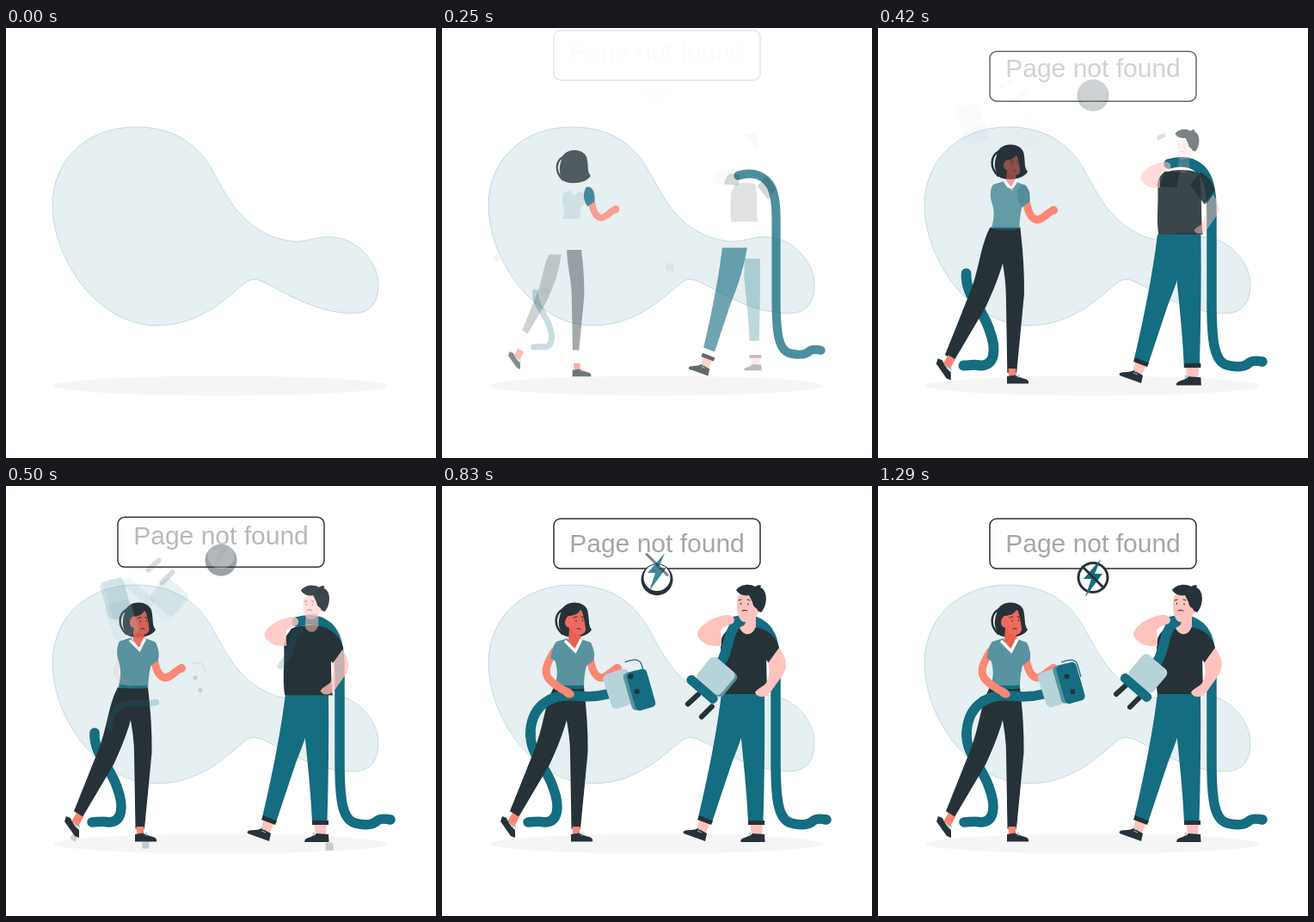
Write an HTML page that moves like this. It is 500 by 500 pixels and loops after 1.33 s.

```html
<!DOCTYPE html>
<html lang="en">
<head>
<meta charset="utf-8">
<title>Page not found</title>
<style>
  html, body { margin: 0; width: 100%; height: 100%; overflow: hidden; background: #fff; }
  svg { display: block; width: 100vw; height: 100vh; }
  [data-in] { transform-box: fill-box; transform-origin: center; opacity: 0; }
  .dark { fill: #263238; }
  .teal { fill: #146d80; }
  .mid { fill: #58939f; }
  .pale { fill: #b7d3da; }
  .rose { fill: #fd8774; }
  .pink { fill: #ffc3bd; }
  .chip { fill: #263238; fill-opacity: .22; }
  .cable { fill: none; stroke: #146d80; stroke-width: 11.5; stroke-linecap: round; }
  .limb { fill: none; stroke: #fd8774; stroke-width: 9; stroke-linecap: round; }
  .line { fill: none; stroke: #263238; stroke-linecap: round; }
  .lace { fill: none; stroke: #8cc0cb; stroke-width: 1; }
</style>
</head>
<body>
<!-- data-in: start ms, duration ms, initial scale, initial dx, initial dy -->
<svg viewBox="0 0 500 500">
  <path d="M151 115C200 115 225 140 238 162C252 186 264 214 290 232C308 244 328 249 342 248C354 247 364 242 378 243C408 244 433 272 433 298C433 322 422 332 402 332C365 331 330 312 307 299C296 293 287 290 280 295C262 308 230 346 175 346C108 346 54 270 54 205C55 150 97 115 151 115Z" fill="#e6eff2" stroke="#7fb0bb" stroke-width=".4"/>
  <ellipse cx="249.5" cy="416" rx="194" ry="11.3" fill="#f5f5f5"/>

  <!-- banner -->
  <rect data-in="153 545 1 0 -40" x="130" y="38" width="240" height="58" rx="8" fill="#fff" stroke="#263238" stroke-width="1.5"/>
  <text data-in="190 600 1 0 -40" x="250" y="76.5" text-anchor="middle" font-family="'Liberation Sans', Arial, sans-serif" font-size="30" fill="#a6a6a6">Page not found</text>

  <!-- no-power sign -->
  <circle data-in="223 770 1 0 -37" class="dark" cx="250" cy="106.5" r="18.5"/>
  <circle data-in="300 780 1 0 -34" cx="250" cy="106.5" r="15.5" fill="#fff"/>
  <path data-in="395 820 1 0 -36" class="teal" d="M259 85L239 108H248L241 129L261 102H252Z"/>
  <path data-in="490 800 1 0 -36" class="line" stroke-width="3" d="M238 94L262 118"/>

  <!-- woman -->
  <path data-in="170 320 .5" class="cable" d="M103 287C102 312 120 324 129 350C138 374 135 391 119 391C112 389 106 391 100 391"/>
  <path data-in="172 320 .5" class="dark" d="M130 234H153C149 265 139 295 125 324L89 385L79 378L109 303C119 275 119 255 130 234Z"/>
  <path data-in="141 320 .5" class="dark" d="M141 234H165C168 260 170 285 169.500 310L161 398.500H150.500L149 310C149 285 141 260 141 234Z"/>
  <path data-in="150 420 1 -18 -165" class="chip" d="M77 392l6 4l-4 7l-6 -4z"/>
  <path data-in="150 420 1 -50 -130" class="chip" d="M155 405h8v8h-8z"/>
  <g data-in="128 300 .6 16 -22">
    <path class="rose" d="M82 380L90 385L84 396L76 390Z"/>
    <path class="dark" d="M70 384L75 386Q78 394 85 400L85 409L80 407L68 390Z"/>
    <path class="lace" d="M78 392l5 3m-3 1l5 -2v4"/>
  </g>
  <g data-in="112 300 .6 0 -22">
    <path class="rose" d="M151.500 396H160.500L160 406H152Z"/>
    <path class="dark" d="M150 405L160 403.500C165 408 174 407 175 411V413.500H150Z"/>
    <path class="lace" d="M160 405l4 -2m-2 4l3 -3"/>
  </g>
  <path data-in="390 450 .5" class="cable" d="M192 242C176 246 165 245 152 244C124 242 103 258 103 290"/>
  <g data-in="92 310 .5">
    <path class="limb" d="M172 200C174 213 178 222 185 223C192 223 197 214 204 212"/>
    <ellipse class="rose" cx="204" cy="212" rx="5" ry="5"/>
    <path class="teal" d="M165 183C173 180 178 190 176 202L167 208C161 200 161 190 165 183Z"/>
  </g>
  <path data-in="162 430 .5" class="mid" d="M133 181L146 177C150 189 158 188 162 178L173 182C177 190 178 197 176 203L168 209Q165 220 165 234H131C135 220 134 212 132 205C129 197 129 186 133 181Z"/>
  <path data-in="250 450 .5" fill="none" stroke="#146d80" stroke-width="4" d="M131 232.500Q148 235 165 233.500"/>
  <g data-in="440 380 .6">
    <path class="limb" d="M130 193C122 206 118 216 124 224C130 231 138 236 147 240"/>
    <ellipse class="rose" cx="147" cy="241" rx="7" ry="5" transform="rotate(25 147 241)"/>
    <path class="mid" d="M133 181C127 188 128 196 126 200L134 205L139 188Z"/>
  </g>
  <g data-in="90 310 .75 0 25">
    <path class="dark" d="M138 148C139 133 164 131 169 144C172 155 169 161 174 167C169 176 152 178 142 174C134 166 135 156 138 148Z"/>
    <path class="line" stroke-width="2.500" d="M141 143C130 149 130 163 140 172"/>
  </g>
  <g data-in="240 460 .6">
    <path fill="#e8604f" d="M148 164L147 180L155 191L162 179L160 170Z"/>
    <path fill="#ee6a5c" d="M147 151C153 151 158 149 161 144C166 146 168 153 168 161C168 169 165 173 160 173C155 173 151 170 149 165C142 165 141 155 147 151Z"/>
    <path fill="none" stroke="#fff" stroke-width="3.500" d="M143 180L155 192L162 178"/>
    <path class="dark" d="M159 139C165 146 166 160 168 172L173 167C169 157 172 145 159 139Z"/>
    <path class="line" stroke-width="1" d="M156 156v1.500M163.500 155.500v1.500M153 153l4 -1M162 152l3 1M157 166h4"/>
  </g>

  <!-- socket -->
  <g data-in="392 450 1 -90 -100"><rect class="pale" x="190" y="213" width="31" height="42" rx="6" transform="rotate(-18 205.5 234)"/></g>
  <g data-in="380 540 1 -115 -120">
    <rect class="mid" x="208" y="207" width="20" height="45" rx="5" transform="rotate(-16 218 230)"/>
    <rect class="teal" x="212" y="206" width="24" height="46" rx="5" transform="rotate(-16 224 229)"/>
  </g>
  <g class="dark" data-in="400 480 .8"><circle cx="219.5" cy="221.5" r="3"/><circle cx="226.5" cy="239" r="3"/></g>
  <path data-in="400 500 .6" fill="none" stroke="#146d80" stroke-width="1.300" d="M213 205C222 201 230 201 232 208L236 222"/>

  <!-- man -->
  <path data-in="90 315 .5" class="cable" d="M338 158C358 152 374 158 382 174C388 188 388 205 388 220V320C388 365 391 388 406 392C418 395 427 394 432 389C436 386 442 387 447 388"/>
  <path data-in="163 320 .5" class="teal" d="M347 241H375C375.500 290 375 340 373.500 391H356C354 350 350 315 346 275Z"/>
  <path data-in="112 320 .5" class="teal" d="M325 241H361C355 275 346 300 337 322L314 391L298 385Q318 300 325 241Z"/>
  <path data-in="150 420 1 -130 -165" class="chip" d="M363 404h9v9h-9z"/>
  <g data-in="98 310 .6 16 -26">
    <path class="pink" d="M300 386L312 392L306 405L296 401Z"/>
    <path class="dark" d="M299 383L315 389.500L313 394L297 388Z"/>
    <path class="dark" d="M281 404C279 398 291 402 297 398L308 404L306 413Z"/>
    <path class="lace" d="M297 401l5 2m-4 -4l4 1"/>
  </g>
  <g data-in="156 320 .6 0 -18">
    <path class="pink" d="M358 390H373L372 406H360Z"/>
    <path class="dark" d="M356 389H375V394H356Z"/>
    <path class="dark" d="M347.500 414C346 408 358 409 361 404L375 405L375.500 414Z"/>
    <path class="lace" d="M356 407l3 -4m0 2l-2 -2"/>
  </g>
  <path data-in="140 480 .6" class="dark" d="M334 166L351 168L348 186L324 185C324 176 328 170 334 166Z"/>
  <path data-in="140 480 .6" class="dark" d="M375 167C385 172 390 180 392 189L380 206L362 182Z"/>
  <path data-in="165 430 .5" class="dark" d="M332 167C345 161 366 163 374 167C379 180 376 220 379 242H325C322 225 325 205 324 185Z"/>
  <path data-in="200 580 .6" class="pink" d="M392 188C402 203 402 210 396 220L381 241C375 247 366 246 364 240C367 235 374 233 377 229C380 222 382 215 379 206Z"/>
  <path data-in="300 500 .6" class="pink" d="M347 146H365V163C361 175 351 175 346 165Z"/>
  <path data-in="395 460 .6" class="cable" d="M347 158C335 162 334 182 329 195C326 205 319 213 314 219"/>
  <path data-in="155 640 .6 10 6" class="pink" d="M325 186C309 188 298 180 297 172C299 162 315 152 330 150C338 149 343 155 338 160C330 163 325 165 324 168Z"/>
  <g data-in="300 500 .6">
    <path class="pink" d="M344 128C350 123 366 122 369 135C371 140 373 146 367 148C365 155 358 159 351 158C343 156 342 140 344 128Z"/>
    <path class="line" stroke-width="1" d="M347.500 136v1.500M356 136.500v1.500M345 133l3 -1M355 132l3 1M349 145q3 -1.500 6 0"/>
  </g>
  <path data-in="205 500 .5" class="dark" d="M342 121C347 114 358 113 364 117C368 114 373 115 370 118C379 121 379 139 371 147L367 145C366 140 362 143 361 135L357 127C352 128 346 127 342 121Z"/>
  <path data-in="180 480 1 -150 15" class="chip" d="M362 122l10 -4v5l-9 4z"/>

  <!-- plug -->
  <g data-in="385 530 1 -135 -175"><path class="line" stroke-width="6" d="M289 231L277 242M305 245L293 257"/></g>
  <g data-in="400 570 1 -140 -100"><rect class="mid" x="296" y="201" width="36" height="34" rx="6" transform="rotate(40 314 218)"/></g>
  <g data-in="420 570 1 -140 -90"><rect class="pale" x="296" y="201" width="36" height="34" rx="6" transform="rotate(40 314 218)"/></g>
  <g data-in="425 580 1 -155 -118"><rect class="teal" x="278" y="229" width="44" height="11" rx="5" transform="rotate(41 300 234.5)"/></g>
</svg>
<script>
const LOOP = 1330;
const parts = [...document.querySelectorAll('[data-in]')].map(el => {
  const [start, span, scale, dx = 0, dy = 0] = el.dataset.in.split(' ').map(Number);
  return { el, start, span, scale, dx, dy };
});

const bezier = (a, b, u) => 3 * (1 - u) * u * ((1 - u) * a + u * b) + u ** 3;

// Ease with a slight overshoot near the end
function ease(x) {
  if (x <= 0 || x >= 1) return x <= 0 ? 0 : 1;
  let low = 0, high = 1;
  for (let i = 0; i < 20; i++) {
    const mid = (low + high) / 2;
    if (bezier(.36, .5, mid) < x) low = mid; else high = mid;
  }
  return bezier(-.01, 1.38, low);
}

function draw(now) {
  const time = now % LOOP;
  for (const { el, start, span, scale, dx, dy } of parts) {
    const p = ease((time - start) / span), rest = 1 - p;
    el.style.opacity = Math.max(0, Math.min(1, p));
    el.style.transform = `translate(${dx * rest}px, ${dy * rest}px) scale(${1 - (1 - scale) * rest})`;
  }
  requestAnimationFrame(draw);
}
requestAnimationFrame(draw);
</script>
</body>
</html>
```
